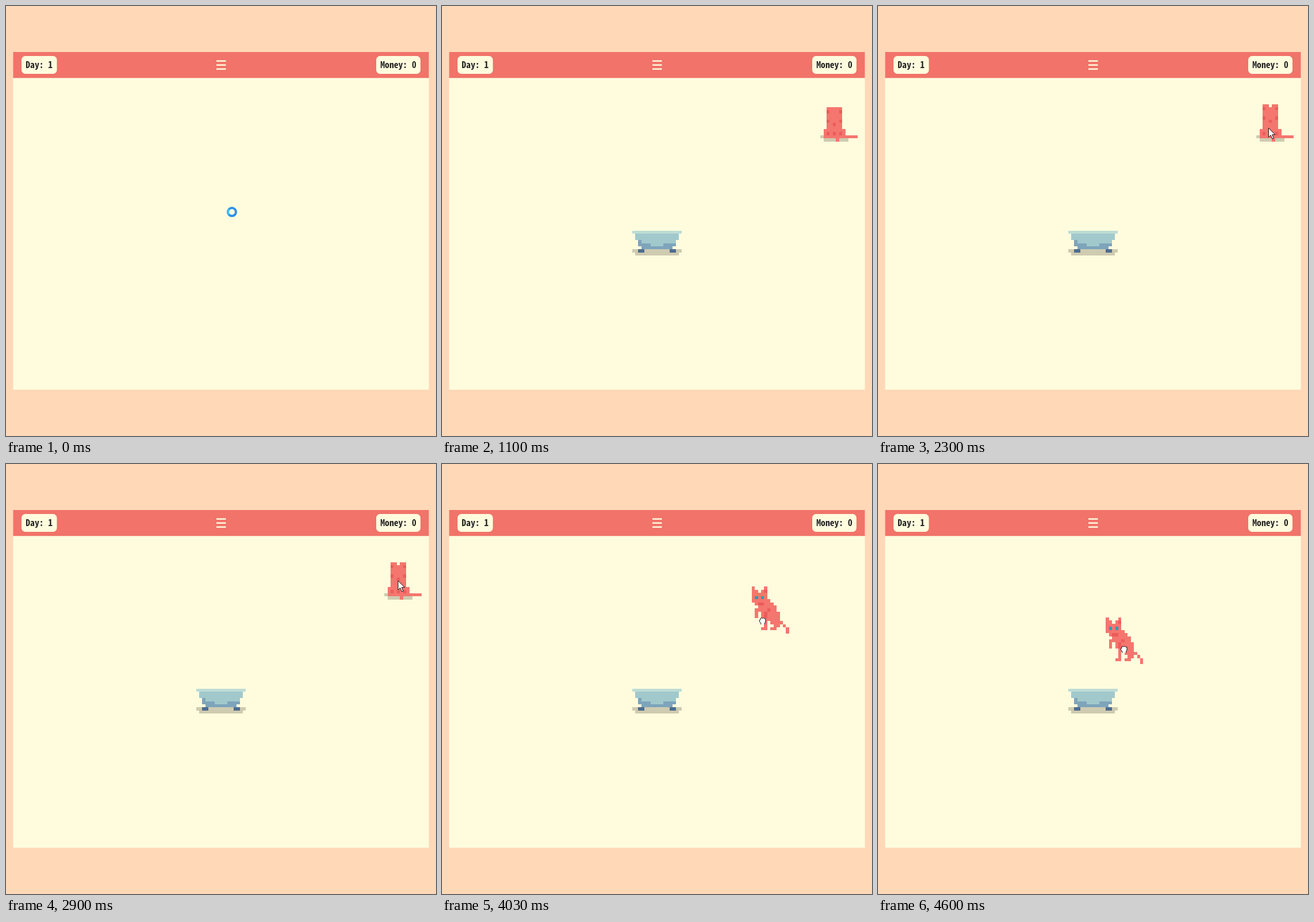
Write an HTML page with a canvas that moves like this. It is 748 by 748 pixels and loops after 4.7 s.

```html
<!DOCTYPE html>
<html lang="en">
<head>
<meta charset="utf-8">
<title>Cat bath game</title>
<style>
  html, body { margin: 0; width: 100%; height: 100%; overflow: hidden; background: #ffd8b8; }
  canvas { display: block; }
</style>
</head>
<body>
<canvas id="stage" width="748" height="748"></canvas>
<script>
const ctx = document.getElementById('stage').getContext('2d');
const LOOP = 4700, UNIT = 5.43;
const PEACH = '#ffd8b8', CREAM = '#fffcde', RED = '#f17369', COAT = '#f4766e',
      SPOT = '#ec5c5c', SHADE = '#cecbb0', EYE = '#2b9fae';
const RIM = '#bddcd4', BOWL = '#a1c9cc', BOWL_DARK = '#7ea4bb', FEET = '#4e6d91';
const ARROW = new Path2D('M0 0V16L3.7 12.5 6.5 19 9 18 6.3 11.6H11.5Z');
const FIST = new Path2D('M-3 6V4L-5.5 1V-1.5L-4-2V-4.5L-2-5.5-.5-4.5 1.5-5.5 3-4.2 5-4V1L3.5 4V6');

const clamp = v => Math.min(1, Math.max(0, v));
const easeOut = (p, power) => 1 - (1 - p) ** power;
const progress = (t, start, end) => clamp((t - start) / (end - start));

// Returns a function that fills whole sprite cells from the given corner.
const grid = (left, top) => (color, x, y, w = 1, h = 1) => {
  const px = v => Math.round(left + v * UNIT), py = v => Math.round(top + v * UNIT);
  ctx.fillStyle = color;
  ctx.fillRect(px(x), py(y), px(x + w) - px(x), py(y + h) - py(y));
};

function rect(color, x, y, w, h, radius = 0) {
  ctx.fillStyle = color;
  ctx.beginPath();
  ctx.roundRect(x, y, w, h, radius);
  ctx.fill();
}

function pill(label, x, w) {
  rect(CREAM, x, 87, w, 31, 6.5);
  ctx.fillStyle = '#222';
  ctx.font = '600 15.6px "Noto Sans Mono CJK JP", "Noto Sans Mono", monospace';
  ctx.fillText(label, x + 7.3, 108);
}

function scene() {
  rect(PEACH, 0, 0, 748, 748);
  rect(CREAM, 12.4, 80, 723.2, 587.5);
  rect(RED, 12.4, 80, 723.2, 45.2);
  pill('Day: 1', 27, 61.5);
  pill('Money: 0', 644, 77);
  for (let i = 0; i < 3; i++) rect(CREAM, 366, 94.4 + 7 * i, 16.5, 2.5);
}

function ring(color, from, to) {
  ctx.lineWidth = 4;
  ctx.strokeStyle = color;
  ctx.beginPath();
  ctx.arc(393, 358.3, 7, from, to);
  ctx.stroke();
}

function spinner(t) {
  const turn = Math.PI + t / 160;
  ring('#3190e6', 0, 7);
  ring('#43bdf3', turn - 0.8, turn + 0.8);
}

function bath() {
  const cell = grid(330.6, 390.8);
  cell(SHADE, 0, 6, 16);
  cell(SHADE, 1, 7, 14);
  cell(RIM, 0, 0, 16);
  for (let y = 1; y < 6; y++) {
    const inset = Math.floor((y + 1) / 2);
    cell(y < 5 ? BOWL : BOWL_DARK, inset, y, 16 - 2 * inset);
  }
  cell(BOWL_DARK, 2, 3);
  for (const x of [2, 10]) cell(BOWL_DARK, x, 4, 4);
  for (const x of [2, 12]) cell(FEET, x, 6, 2);
}

function walkingCat(t) {
  const cell = grid(680 - (t - 560) * 0.15, 176);
  const swing = Math.cos((t - 560) / 90);
  cell(SHADE, 0, 9, 16, 2);
  for (const hip of [3, 13]) {
    for (let i = 0; i < 4; i++) {
      cell(SPOT, hip - Math.round(swing * i), 6 + i);
      cell(COAT, hip + 2 + Math.round(swing * i / 3), 6 + i);
    }
  }
  cell(COAT, 1, 0);
  cell(COAT, 1, 1, 2);
  cell(COAT, 0, 2, 16, 3);
  cell(COAT, 3, 5, 13);
  cell(EYE, 0, 3);
  rect(PEACH, 735.6, 126, 13, 540);
}

function sittingCat(t) {
  const cell = grid(658.2, 170.5);
  const lift = Math.floor(t / 400) % 2;
  cell(SHADE, 0, 10, 2);
  cell(SHADE, 1, 11, 8);
  cell(COAT, 2, 1 - lift, 5, 8);
  if (lift) cell(CREAM, 4, 0);
  cell(COAT, 1, 8, 7, 3);
  cell(COAT, 8, 10, 4);
  cell(COAT, 5, 11);
  for (const x of [2, 4, 6]) {
    if (x !== 4) cell(SPOT, x, 2 - lift);
    cell(SPOT, x, 5 - lift + (x === 4));
    cell(SPOT, x, 9);
  }
}

function heldCat(t) {
  const p = progress(t, 3800, 4600);
  const cell = grid(652.3 - 256 * easeOut(p, 1.72), 159.7 + 107.3 * easeOut(p, 2.04));
  for (const side of [0, 1]) {
    cell(COAT, 4 * side, 0, 1, 2);
    cell(COAT, 1 + 2 * side, 1);
  }
  cell(COAT, 0, 2, 5, 3);
  cell(COAT, 5, 4);
  // The back slants half a cell per row.
  for (let y = 5; y < 12; y++) {
    const left = Math.round(1 + (y - 5) / 2);
    cell(COAT, left, y, Math.min(9, left + 6) - left);
  }
  for (let i = 0; i < 3; i++) cell(COAT, 9 + i, 11 + i, 1, i < 2 ? 1 : 2);
  cell(COAT, 1, 7, 1, 3);
  for (const x of [3, 6]) {
    cell(COAT, x + 1, 12, x / 3);
    cell(COAT, x, 13, 2);
  }
  cell(CREAM, 5, 11);
  cell(SPOT, 4, 1);
  cell(SPOT, 2, 5, 2);
  cell(SPOT, 5, 7);
  cell(SPOT, 4, 8, 1, 2);
  for (const x of [1, 3]) cell(EYE, x, 3);
  cursor(FIST, 682 - 254 * easeOut(p, 1.97), 220 + 102.5 * easeOut(p, 2.14));
}

function cursor(path, x, y) {
  ctx.save();
  ctx.translate(x, y);
  ctx.lineWidth = 1;
  ctx.lineJoin = 'round';
  ctx.fillStyle = '#fff';
  ctx.strokeStyle = '#111';
  ctx.fill(path);
  ctx.stroke(path);
  ctx.restore();
}

function pointer(t) {
  const enter = easeOut(progress(t, 1560, 1860), 2);
  const up = progress(t, 1860, 2900), down = progress(t, 2900, 3600);
  cursor(ARROW, 755 - 77.5 * enter + 4.5 * up, 219 - 16 * up + 15 * down);
}

function frame(now) {
  const t = now % LOOP;
  scene();
  if (t < 120) spinner(t);
  else bath();
  if (t >= 3700) heldCat(t);
  else if (t >= 740) sittingCat(t);
  else if (t > 180) walkingCat(t);
  if (t > 1560 && t < 3700) pointer(t);
  requestAnimationFrame(frame);
}
requestAnimationFrame(frame);
</script>
</body>
</html>
```
